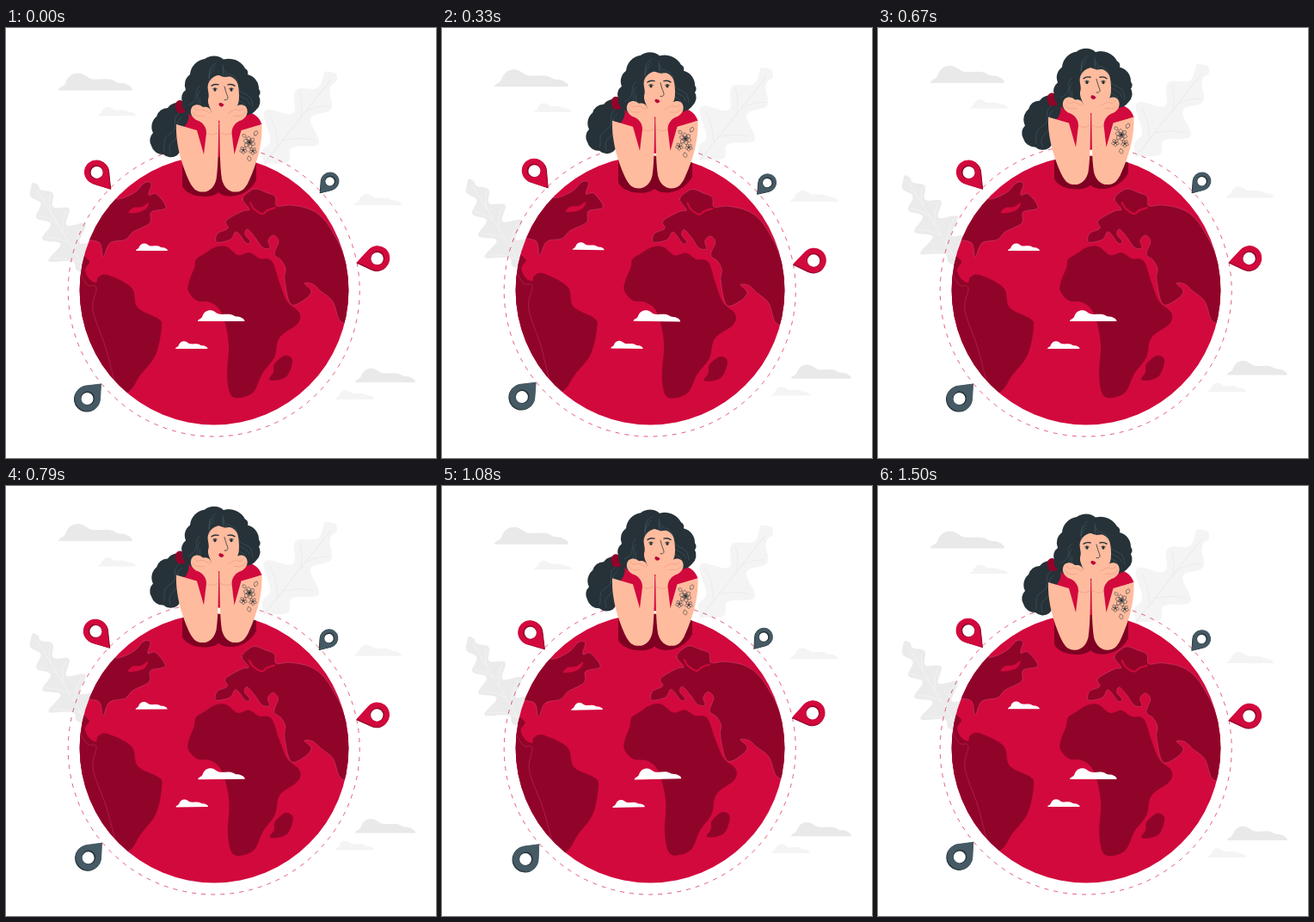
Animation of 500x500 px, one loop 1.54 s. Source, as an HTML page:

```html
<!DOCTYPE html>
<html lang="en">
<head>
<meta charset="utf-8">
<title>Girl on a globe</title>
<style>
html,body{margin:0;width:100%;height:100%;overflow:hidden;background:#fff}
svg{display:block;width:100vw;height:100vh}
</style>
</head>
<body>
<svg id="stage" viewBox="0 0 500 500" fill="none" stroke-linecap="round" stroke-linejoin="round"></svg>
<script>
const RED = '#d2093d', DARK = '#91042a', HAIR = '#263238', SLATE = '#455a64', SKIN = '#ffbb9e', COAST = '#c9557b';
const CX = 242, CY = 305, R = 156.4;

const pairs = text => text.split(' ').reduce((p, v, i) => (i % 2 ? p[p.length - 1].push(+v) : p.push([+v]), p), []);

// Smooth curve through points
function curve(p, closed) {
  const n = p.length, at = i => closed ? p[(i + n) % n] : p[Math.max(0, Math.min(n - 1, i))];
  let d = 'M' + p[0];
  for (let i = 0; i < n - !closed; i++) {
    const [a, b, c, e] = [at(i - 1), at(i), at(i + 1), at(i + 2)];
    const near = k => [b[k] + (c[k] - a[k]) / 6, c[k] - (e[k] - b[k]) / 6];
    const [x, y] = [near(0), near(1)];
    d += `C${x[0]} ${y[0]} ${x[1]} ${y[1]} ${c}`;
  }
  return d + (closed ? 'Z' : '');
}
const path = (d, fill, more = '') => `<path d="${d}" fill="${fill}" ${more}/>`;
const stroke = (d, color, w) => path(d, 'none', `stroke="${color}" stroke-width="${w}"`);
const blob = (text, fill, more) => path(curve(pairs(text), true), fill, more);
const line = (text, color, w) => stroke(curve(pairs(text)), color, w);
const repeat = (n, f) => Array.from({ length: n }, (_, i) => f(i)).join('');

const CLOUD = 'M0 0C0-4 6-4 8-8C11-17 17-20.5 24-20C32-19 33-14 40-13C48-12 58-15 65-11C69-8 72-9 77-8C82-6 86-4 86 0Z';
const cloud = (x, y, w, fill) => path(CLOUD, fill, `transform="translate(${x} ${y}) scale(${w / 86})"`);

// Lobed leaf from base to tip; each side has its own lobe phase
function leaf(bx, by, tx, ty, width, lobes, phases, fill, vein) {
  const len = Math.hypot(tx - bx, ty - by), dx = (tx - bx) / len, dy = (ty - by) / len;
  const spot = (u, off, side) => [bx + dx * (u * len + off * .15) + side * dy * off, by + dy * (u * len + off * .15) - side * dx * off];
  const reach = (u, p) => width * (1 - .8 * u) * Math.min(1, u * 4) * (.33 + .67 * Math.sin(Math.PI * (lobes * u + p)) ** 2);
  const edge = (side, p) => Array.from({ length: 41 }, (_, i) => spot(i / 41, reach(i / 41, p), side));
  const outline = [...edge(1, phases[0]), spot(1.03, 0, 1), ...edge(-1, phases[1]).reverse()];
  const veins = [1, -1].map((side, k) => repeat(lobes, i => {
    const u = (i + 1.5 - phases[k]) / lobes;
    return u > .9 ? '' : stroke(curve([spot(u - .14, 0, side), spot(u - .05, reach(u, phases[k]) * .4, side), spot(u, reach(u, phases[k]) * .8, side)]), vein, .5);
  })).join('');
  return path(curve(outline, true), fill) + stroke(curve([spot(0, 0, 1), spot(.95, 0, 1)]), vein, .6) + veins;
}

// Map pin: round head whose sides run straight to the tip
function pin(x, y, r, tx, ty, hole, front, side, ox, oy) {
  const len = Math.hypot(tx - x, ty - y), turn = Math.atan2(ty - y, tx - x) * 180 / Math.PI;
  const px = r * r / len, py = Math.sqrt(r * r - px * px);
  const put = (dx, dy, fill) => path(`M${len} 0L${px} ${-py}A${r} ${r} 0 1 0 ${px} ${py}Z`, fill,
    `transform="translate(${x + dx} ${y + dy}) rotate(${turn})" stroke="${fill}" stroke-width="1"`);
  return put(ox, oy, side) + put(0, 0, front) +
    `<circle cx="${x}" cy="${y}" r="${hole + 1}" fill="${side}"/><circle cx="${x + ox * .5}" cy="${y + oy * .5}" r="${hole}" fill="#fff"/>`;
}

const shore = `stroke="${COAST}" stroke-width=".45"`;
const america =
  blob('161 180 169 181 166 194 175 193 186 209 169 214 167 227 148 237 139 246 121 250 113 266 109 250 92 240 112 196 131 199 150 191', DARK, shore) +
  blob('143 215 148 209 158 208 166 203 163 210 155 214', RED) +
  blob('80 270 97 271 92 281 97 292 105 296 107 290 118 287 146 302 153 325 177 338 181 348 174 380 156 404 141 424 110 430 70 360', DARK) +
  line('87 287 95 299 105 302 101 328 116 372 127 415', '#c02a56', .6);
const eurasia =
  blob('275 199 283 190 291 187 302 191 313 196 315 207 331 206 354 211 371 224 387 250 396 272 415 310 400 340 388 340 380 318 366 306 357 298 347 297 355 306 347 316 331 321 324 293 325 280 320 270 312 263 317 248 311 241 305 247 307 256 298 255 290 244 281 234 278 240 284 248 279 250 268 237 261 246 245 249 246 239 258 233 256 224 275 213 283 211', DARK, shore) +
  line('284 203 288 210 298 216 304 212 313 209', RED, 2);
const africa =
  blob('230 263 243 255 256 254 270 264 283 261 295 268 309 271 318 296 327 318 341 331 339 344 318 360 312 383 298 402 288 423 272 430 261 426 257 403 259 370 255 344 248 327 237 319 222 317 212 306 213 294 219 279 221 269', DARK) +
  blob('324 381 333 386 328 403 318 409 306 409 311 400 312 391', DARK);

const PALE = '#f4f4f4', GREY = '#e9e9e9';
const backdrop =
  cloud(61, 72.5, 86, GREY) + cloud(107, 102, 44, PALE) + cloud(405, 206, 55, PALE) + cloud(406, 412, 70, GREY) + cloud(383, 431.8, 45, PALE) +
  leaf(95, 285, 33, 183, 40, 4.5, [.33, .75], '#ebebeb', '#f8f8f8') +
  leaf(300, 158, 381, 56, 52, 3, [.48, .27], PALE, '#e0e0e0');

// Scalloped outline: one round curl between each two points, clockwise
function curls(text) {
  const p = pairs(text);
  return path('M' + p[0] + p.map((a, i) => {
    const b = p[(i + 1) % p.length], r = Math.hypot(b[0] - a[0], b[1] - a[1]) * .8;
    return `A${r} ${r} 0 0 1 ${b}`;
  }).join('') + 'Z', HAIR);
}
// Wavy strand of hair from one point to another
function strand(x, y, ex, ey, amp = 2.5) {
  const len = Math.hypot(ex - x, ey - y);
  return stroke(curve(Array.from({ length: 13 }, (_, i) => {
    const u = i / 12, s = amp * Math.sin(u * len / 4.5) / len;
    return [x + (ex - x) * u - (ey - y) * s, y + (ey - y) * u + (ex - x) * s];
  })), SLATE, .6);
}
const mirror = art => art + `<g transform="translate(495.5 0) scale(-1 1)">${art}</g>`;

const petal = (x, y, a, l) => path(`M0 0C${l * .3} ${-l * .55} ${l * .8} ${-l * .4} ${l} 0C${l * .8} ${l * .4} ${l * .3} ${l * .55} 0 0`, 'none', `transform="translate(${x} ${y}) rotate(${a})"`);
const flower = (x, y, l, n) => repeat(n, i => petal(x, y, i * 360 / n + 20, l));
const tattoo = `<g stroke="${HAIR}" stroke-width=".5">` +
  flower(283, 133, 7, 6) + flower(283, 133, 3.5, 5) + flower(276, 142, 4.5, 5) + flower(287, 143, 4.5, 5) +
  petal(289, 125, -60, 6) + petal(282, 149, 75, 6) + petal(279, 127, 220, 5) + '</g>';

const crease = text => line(text, '#e58f78', .5);
const shirt = path('M198 112C202 101 210 97 222 97L248 104V150H228L218 119Z', RED);
const arm =
  path('M198 112L222 119L230 147L233 122C233 116 230 111 224 108C216 106 212 97 217 91C221 88 226 89 229 92C235 91 238 94 239 98C243 101 247 105 247.3 110C246.8 135 247 160 244.5 176C242 186 236 190.6 229 190.6C221 190.6 218 187 214 180C206 163 197 138 198 112Z', SKIN) +
  crease('219 93 223 96 229 95 237 99') + crease('217 98 222 102 231 102') + crease('233 122 239 124 246 122');

const face =
  blob('234 69 238 60 246 55 254 57 262 57 269 64 271 80 268 92 255 107 244 106 237 94 233 80', SKIN) +
  path('M237 58C231 68 238 76 235 83C234 91 241 96 239 104L226 100L226 64Z', HAIR) +
  [[243, -1], [262, 1]].map(([x, s]) =>
    `<ellipse cx="${x}" cy="71.8" rx="1.6" ry="2" fill="${HAIR}"/>` +
    stroke(`M${x - 2.6} 70.6q2.6-2 5.2 0`, HAIR, .7) + stroke(`M${x + s * 4} 67.3q${-s * 3}-2.6 ${-s * 8}-1.4`, HAIR, 1.4)).join('') +
  line('254 68 256 75 258 81 256.5 83.5 254 83.5', HAIR, .8) +
  path('M247.2 89Q248.5 85.5 250 87.2Q252 87 253.5 89.5Q250.5 94 247.2 89Z', '#b8083a');

const girl =
  mirror(shirt) +
  curls('212 98 203 118 202 134 199 148 183 147 169 137 171 122 175 103 188 93 206 88') +
  strand(203, 98, 181, 142) + strand(204, 104, 190, 146) +
  blob('197 88 202 84 209 88 209 97 202 99 198 96', DARK) +
  curls('231 36 253 36.5 278 47 281 54 294 71 294 79 291 95 270 100 238 104 212 99 205 86 209 72 214 54') +
  repeat(3, i => strand(244 - i, 41 + i * 4, 213 + i * 6, 90) + strand(252, 43 + i * 3, 288 - i * 6, 90)) +
  face + mirror(arm) + tattoo;

const shadow = path('M205 130V184C212 198 240 199 247 191C255 199 280 198 291 177V130Z', '#7f0023');

const stage = document.getElementById('stage');
stage.innerHTML =
  `<clipPath id="disc"><circle cx="${CX}" cy="${CY}" r="${R}"/></clipPath><rect width="500" height="500" fill="#fff"/>` +
  `<g class="bob">${backdrop}</g>` +
  `<g class="turn"><circle cx="${CX - .3}" cy="${CY + .5}" r="169.5" stroke="${RED}" stroke-width=".65" stroke-dasharray="5 6.09" stroke-linecap="butt"/></g>` +
  `<circle cx="${CX}" cy="${CY}" r="${R}" fill="${RED}"/>` +
  `<g clip-path="url(#disc)"><g class="turn">${america}${eurasia}${africa}</g><g class="bob">${shadow}</g></g>` +
  `<g class="turn">${cloud(151, 259, 37, '#fff')}${cloud(223, 341, 54.5, '#fff')}${cloud(197, 373, 37.5, '#fff')}` +
  pin(105, 167.5, 13.5, 120.5, 186.5, 7, RED, DARK, 1.2, .8) +
  pin(432, 267.5, 13.8, 409, 272, 7.2, RED, DARK, -.8, 1.2) +
  pin(95, 430.5, 14.5, 110.5, 414, 7, SLATE, HAIR, -1, 1) +
  pin(377, 178, 10, 366, 191, 5.2, SLATE, HAIR, -.8, .7) + '</g>' +
  `<g class="bob">${girl}</g>`;

const LOOP = 1540, STEP = 1000 / 24;
const bobs = stage.querySelectorAll('.bob'), turns = stage.querySelectorAll('.turn');
const wave = t => t * 2 * Math.PI / LOOP;
const lift = t => -4.4 * (1 - Math.cos(wave(t + 45)));
const tilt = t => .95 * Math.sin(wave(t + 55));

function draw(ms) {
  // 24 pictures a second, each shown from the nearest 10 ms
  const t = Math.floor((Math.floor(ms % LOOP / 10) * 10 + 4.99) / STEP) * STEP;
  const up = lift(t) - lift(0), turn = tilt(t) - tilt(0);
  bobs.forEach(g => g.setAttribute('transform', `translate(0 ${up.toFixed(3)})`));
  turns.forEach(g => g.setAttribute('transform', `rotate(${turn.toFixed(4)} ${CX} ${CY})`));
}

let start;
function tick(now) {
  if (start === undefined) start = now;
  draw(Math.max(0, now - start));
  requestAnimationFrame(tick);
}
draw(0);
requestAnimationFrame(tick);
</script>
</body>
</html>
```
